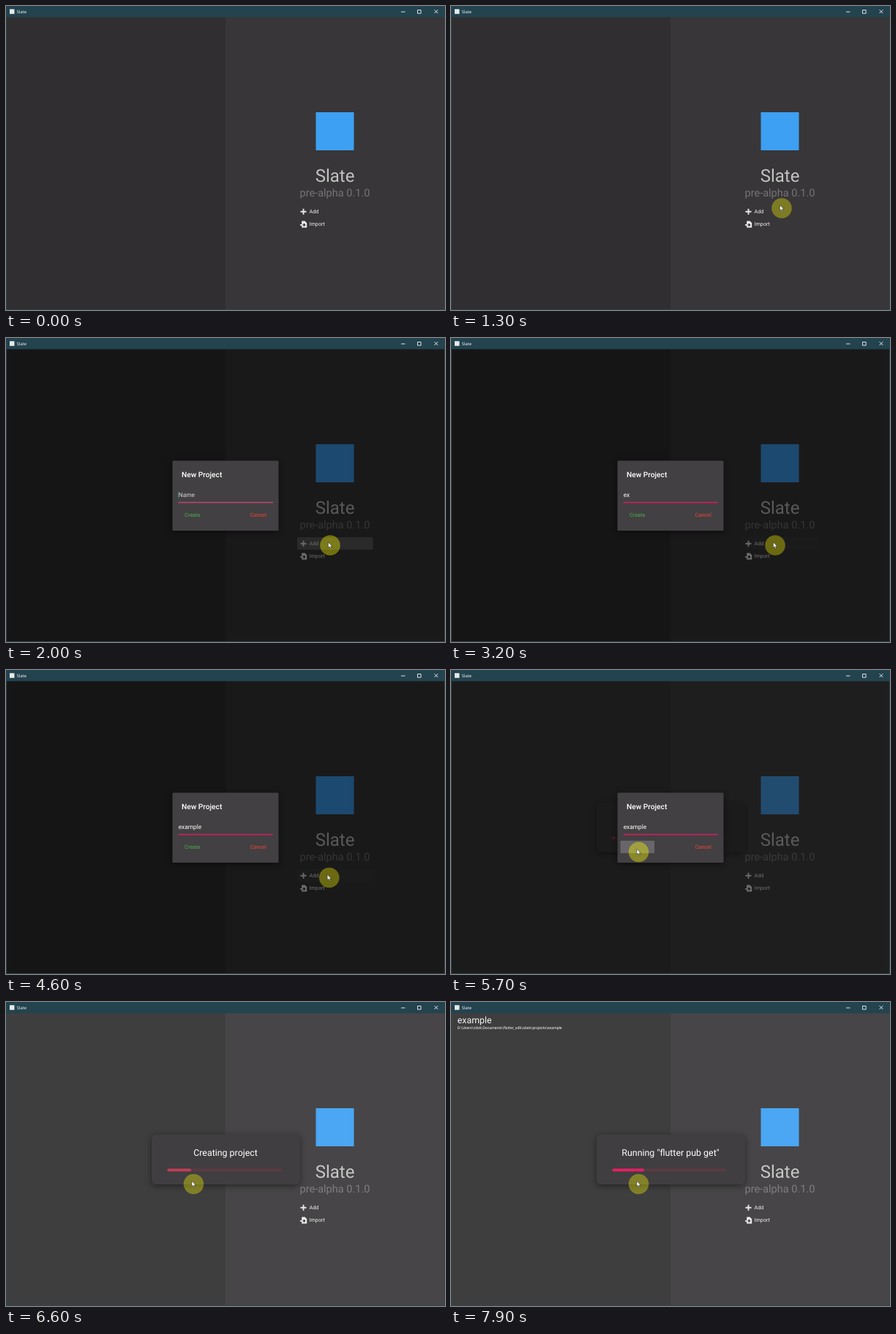
An HTML page that plays this animation: 600x415 px, repeating every 8 s.

```html
<!DOCTYPE html>
<html lang="en">
<head>
<meta charset="utf-8">
<title>Slate</title>
<style>
  html, body { margin: 0; width: 100%; height: 100%; overflow: hidden; background: #302e30; }
  svg { display: block; width: 600px; height: 415px; font-family: Roboto, sans-serif; text-rendering: geometricPrecision; }
  .mid { text-anchor: middle; }
  .card { filter: drop-shadow(0 2px 4px rgba(0, 0, 0, .45)); }
</style>
</head>
<body>
<svg viewBox="0 0 600 415">
  <rect width="600" height="415" fill="#302e30"/>
  <rect x="300" width="300" height="415" fill="#383638"/>

  <!-- welcome pane -->
  <rect x="423.5" y="145" width="52" height="52" fill="#3da0f2"/>
  <text class="mid" x="449.5" y="240.3" font-size="24" fill="#c3c2c3">Slate</text>
  <text class="mid" x="449.5" y="259.6" font-size="14.55" fill="#757375">pre-alpha 0.1.0</text>
  <rect id="addHover" x="398" y="272" width="103.5" height="17" rx="1.5" fill="#fff"/>
  <g fill="#f0f0f0" font-size="7.2">
    <path d="M402.5 280.8h8M406.5 276.8v8" stroke="#e4e4e4" stroke-width="1.9"/>
    <text x="414.6" y="283">Add</text>
    <path d="M404.2 293.5h4.3l2.7 2.7v6.3h-7zM402 298h3v1.8h-3z"/>
    <path d="M405 298.8h3.2M407 296.8l2.2 2-2.2 2z" fill="#383638" stroke="#383638" stroke-width=".9"/>
    <text x="414.6" y="299.8">Import</text>
  </g>

  <g id="project" fill="#f4f4f4">
    <text x="8.7" y="29.3" font-size="12.4">example</text>
    <text x="8.7" y="37.2" font-size="5.17" fill="#fff">D:\Users\nilsk\Documents\flutter_sdk\slate\projects\example</text>
  </g>

  <!-- progress toast -->
  <g id="toast">
    <rect width="600" height="415" fill="#fff" opacity=".075"/>
    <rect class="card" x="199" y="181" width="203" height="68" rx="6" fill="#403e40"/>
    <g class="mid" font-size="12.42" fill="#fff">
      <text id="creating" x="300" y="210">Creating project</text>
      <text id="running" x="300" y="210">Running "flutter pub get"</text>
    </g>
    <rect x="220.5" y="227.4" width="156" height="3.8" rx="1.6" fill="#5b3a42"/>
    <rect id="bar" y="227.4" height="3.8" rx="1.6"/>
  </g>

  <!-- new project dialog -->
  <g id="modal">
    <rect width="600" height="415" opacity=".54"/>
    <rect class="card" x="227.5" y="167.5" width="145" height="95.5" rx="1.5" fill="#424042"/>
    <text x="240" y="189.8" font-size="10.2" font-weight="500" fill="#fff">New Project</text>
    <text id="hint" x="235.7" y="217" font-size="8.35" fill="#d8d6d8">Name</text>
    <text id="typed" x="235.7" y="217" font-size="8.35" fill="#fff"></text>
    <rect id="caret" x="235.4" y="209.5" width=".9" height="9" fill="#2f8f88"/>
    <rect id="underline" x="235.5" y="223.8" width="129.5" height="1.5"/>
    <text x="244" y="243.7" font-size="7.3" fill="#4caf50">Create</text>
    <text x="333.5" y="243.7" font-size="7.3" fill="#f44336">Cancel</text>
    <rect id="createPress" x="231.5" y="233" width="46.5" height="17" rx="1" fill="#686668"/>
  </g>

  <!-- window frame -->
  <rect width="600" height="15.3" fill="#23434f"/>
  <path d="M.5 15V414.5H599.5V15" fill="none" stroke="#2a4549"/>
  <rect x="5" y="4.3" width="6.5" height="6.5" fill="#e6ebe9"/>
  <text x="14.8" y="9.9" font-size="5.8" fill="#fff" style="font-family:'Open Sans',sans-serif">Slate</text>
  <path d="M540 8h5.5M562.5 5.5h4.6v4.6h-4.6zM585.6 5.2l4.8 4.8M590.4 5.2l-4.8 4.8" fill="none" stroke="#f2f5f5" stroke-width=".9"/>

  <g id="pointer">
    <circle r="13.8" fill="#ff0" opacity=".35"/>
    <g id="rings" fill="none" stroke="#ff0" stroke-width=".8" stroke-dasharray="1.2 .8" opacity=".3">
      <circle r="3"/><circle r="5.4"/><circle r="7.8"/><circle r="10.2"/><circle r="12.6"/>
    </g>
    <path transform="translate(-2.6 -4.2)" d="M0 0V7.6L1.8 6 3 8.7 4.3 8.1 3.1 5.6H5.5Z" fill="#fff" stroke="#111" stroke-width=".5"/>
  </g>
</svg>
<script>
const LOOP = 8000, STEP = 100;
const el = Object.fromEntries([...document.querySelectorAll('[id]')].map(e => [e.id, e]));

const ramp = (t, from, to) => Math.min(1, Math.max(0, (t - from) / (to - from)));
const smooth = x => x * x * (3 - 2 * x);
const mix = (a, b, k) => a + (b - a) * k;
const fade = (e, opacity) => e.setAttribute('opacity', opacity);
const within = (t, from, to) => t >= from && t < to ? 1 : 0;

// CSS-style cubic bezier easing, solved by bisection
function bezier(x1, y1, x2, y2) {
  const at = (a, b, s) => 3 * a * s * (1 - s) ** 2 + 3 * b * s * s * (1 - s) + s ** 3;
  return x => {
    let lo = 0, hi = 1;
    for (let i = 0; i < 20; i++) {
      const s = (lo + hi) / 2;
      if (at(x1, x2, s) < x) lo = s; else hi = s;
    }
    return at(y1, y2, lo);
  };
}
const headEase = bezier(.2, 0, .8, 1), tailEase = bezier(.4, 0, 1, 1);

function pointerAt(t) {
  if (t < 1300) {
    const k = 1 - (1 - ramp(t, 850, 1300)) ** 2;
    return [mix(612, 452, k), mix(178, 276, k)];
  }
  if (t <= 4500) {
    const k = smooth(ramp(t, 1300, 1700));
    return [mix(452, 443, k), mix(276, 283, k)];
  }
  const k = smooth(ramp(t, 4550, 5400));
  const curve = (a, b, c) => mix(mix(a, b, k), mix(b, c, k), k);
  return [curve(443, 380, 256.5), curve(283, 306, 248.5)];
}

const keyTimes = [2900, 3100, 3600, 3800, 4000, 4200, 4400];

function drawProgress(t) {
  const second = t >= 7600;
  const elapsed = second ? t - 7660 : Math.min(t, 7000) - 6405;
  const head = Math.max(.025, headEase(ramp(elapsed, 0, 750)));
  const tail = tailEase(ramp(elapsed, 333, 1083));
  el.bar.setAttribute('x', 220.5 + 156 * tail);
  el.bar.setAttribute('width', 156 * (head - tail));
  el.bar.setAttribute('fill', second ? '#e91e63' : '#c03f55');
  fade(el.bar, second ? 1 : 1 - ramp(t, 7200, 7500));
}

function draw(t) {
  const [x, y] = pointerAt(t);
  el.pointer.setAttribute('transform', `translate(${x} ${y})`);
  fade(el.pointer, t < 900 ? 0 : 1);
  fade(el.rings, .3 * (within(t, 1800, 2300) + within(t, 5500, 5900)));

  fade(el.addHover, within(t, 1800, 4700) * mix(.19, .03, ramp(t, 2000, 2400)));
  fade(el.modal, ramp(t, 1700, 2000) * (1 - ramp(t, 5750, 6000)));
  fade(el.hint, 1 - ramp(t, 2800, 3000));
  fade(el.caret, within(t, 1800, 2900));
  el.underline.setAttribute('fill', t < 2400 ? '#c2456a' : '#d81b60');
  el.typed.textContent = 'example'.slice(0, keyTimes.filter(k => t >= k).length);
  fade(el.createPress, within(t, 5500, 8000));

  fade(el.toast, ramp(t, 5450, 5750));
  const swap = ramp(t, 7200, 7500);
  fade(el.creating, 1 - swap);
  fade(el.running, swap);
  fade(el.project, swap);
  drawProgress(t);
}

const start = performance.now();
function tick() {
  const t = (performance.now() - start) % LOOP;
  draw(Math.floor(t / STEP) * STEP);
  requestAnimationFrame(tick);
}
tick();
</script>
</body>
</html>
```
